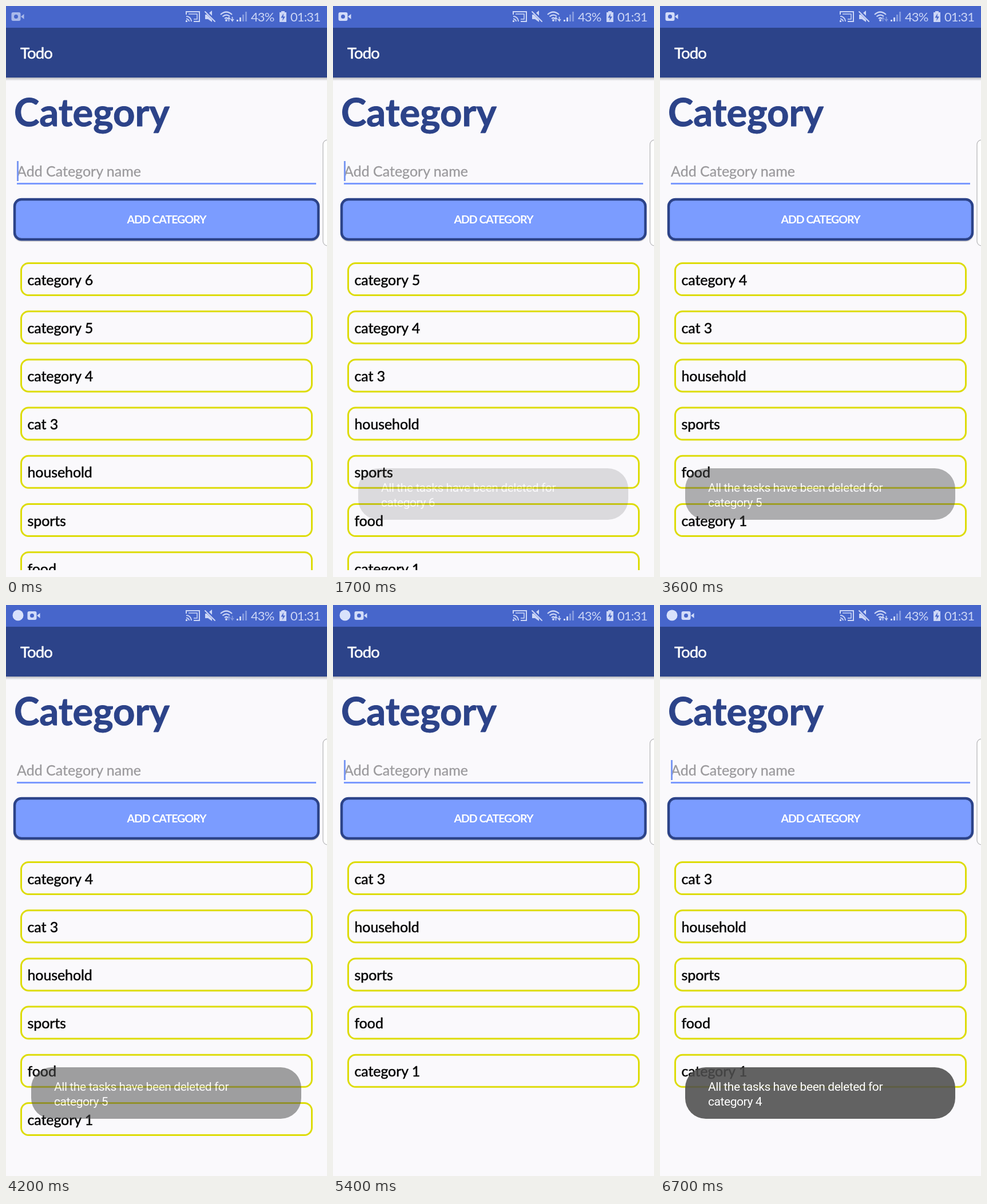
These frames come from a looping animation (561x998 px, 6.8 s). An HTML page:

```html
<!DOCTYPE html>
<html lang="en">
<head>
<meta charset="utf-8">
<title>Todo</title>
<style>
  html, body { margin: 0; width: 100%; height: 100%; overflow: hidden; background: #faf9fc; }
  svg { display: block; width: 561px; height: 998px; }
  text { font-family: Lato, "Open Sans", sans-serif; stroke-linejoin: round; white-space: pre; }
  .status { fill: #ccd6f6; font-size: 22px; letter-spacing: -.9px; }
  .row text { font-size: 25px; fill: #060606; stroke: #060606; stroke-width: .5; letter-spacing: -.1px; }
  .row rect { fill: none; stroke: #dddc08; stroke-width: 3; }
  #toast text { font: 21px Roboto, sans-serif; letter-spacing: -.44px; fill: #fff; }
</style>
</head>
<body>
<svg viewBox="0 0 561 998">
  <defs>
    <linearGradient id="shade" x2="0" y2="1">
      <stop stop-color="#777b88" stop-opacity=".65"/>
      <stop offset="1" stop-color="#999" stop-opacity="0"/>
    </linearGradient>
    <clipPath id="listClip"><rect y="430" width="561" height="556"/></clipPath>
    <clipPath id="rowClip"><rect x="12.5" y="435" width="536" height="84"/></clipPath>
  </defs>

  <rect width="561" height="998" fill="#faf9fc"/>
  <rect y="124" width="561" height="7" fill="url(#shade)"/>
  <rect y="38" width="561" height="87" fill="#2c4389"/>
  <rect width="561" height="38" fill="#4766cb"/>

  <!-- status bar -->
  <circle id="notice" cx="21" cy="18" r="9.5" fill="#d9e2fb"/>
  <g id="camera">
    <path fill-rule="evenodd" d="M3 1H13Q16 1 16 4V13Q16 16 13 16H3Q0 16 0 13V4Q0 1 3 1ZM8 5A3.5 3.5 0 1 0 8 12A3.5 3.5 0 1 0 8 5Z"/>
    <path d="M16.500 8.500L22 4V13Z"/>
  </g>
  <g fill="none" stroke="#ccd6f6" stroke-width="2">
    <path d="M315 15V10H338V27H328M315 18A9 9 0 0 1 324 27M315 22.500A5 5 0 0 1 320 27"/>
    <path d="M319 14H334V23H328" stroke-width="1.500"/>
    <path d="M375 15Q385 6 395 15M378.500 18.500Q385 13 391 18M382 22Q385 19.500 388 22" stroke-width="2.200"/>
    <path d="M348 10L365 27" stroke-linecap="round"/>
  </g>
  <g fill="#ccd6f6">
    <rect x="314" y="25" width="3" height="3"/>
    <path d="M348 15H351L360 24V28L353 23H348ZM355 12L360 8V17Z"/>
    <circle cx="385" cy="25" r="2"/>
    <path d="M403 24h3v3h-3zM408 20h3v7h-3z"/>
    <path d="M413 15h3v12h-3zM418 10h3v17h-3z" opacity=".45"/>
    <path fill-rule="evenodd" d="M481 9H487V11H490V28H478V11H481ZM485 13L480.500 20.500H484L483 26L488 18.500H484.500Z"/>
  </g>
  <path id="arrows" d="M389.500 27V20L387 23M389.500 20L392 23M395.500 19V26L393 23M395.500 26L398 23" fill="none" stroke="#ccd6f6" stroke-width="1.600"/>
  <text class="status" x="428" y="27">43%</text>
  <text class="status" x="497" y="27">01:31</text>

  <!-- header and form -->
  <text x="25" y="92" font-size="27.500" letter-spacing="-.9" fill="#fff" stroke="#fff" stroke-width=".5">Todo</text>
  <text x="14" y="210" font-size="67" font-weight="700" fill="#2c4389" stroke="#2c4389" stroke-width="1">Category</text>
  <text x="19" y="298" font-size="25" fill="#9b9a9d" stroke="#9b9a9d" stroke-width=".3">Add Category name</text>
  <rect x="19" y="309" width="523" height="3" fill="#7b9aff"/>
  <rect id="cursor" x="19" y="271" width="3" height="35" fill="#7b98f2"/>
  <rect x="13" y="338" width="535" height="74" rx="14" fill="#888" opacity=".35"/>
  <rect x="15" y="338" width="531" height="70" rx="12" fill="#7b9cff" stroke="#2c4389" stroke-width="4.500"/>
  <text x="280.500" y="380" font-size="19.500" font-weight="700" letter-spacing="-1" text-anchor="middle" fill="#fff">ADD CATEGORY</text>
  <rect x="554" y="234" width="30" height="185" rx="8" fill="#fff" stroke="#b9b9bb" stroke-width="1.300"/>

  <g id="list" clip-path="url(#listClip)"></g>
  <g clip-path="url(#rowClip)">
    <circle id="ripple" cx="345" r="1333" fill="#2c4389"/>
  </g>

  <g id="toast">
    <rect x="44" y="808" width="472" height="90" rx="36" fill="#4c4c4c" opacity=".87"/>
    <text x="84" y="849">All the tasks have been deleted for</text>
    <text id="toastName" x="84" y="875"></text>
  </g>
</svg>

<script>
const LOOP = 6800, STEP = 100, PITCH = 84.2, FADE = 500;
const names = ["category 6", "category 5", "category 4", "cat 3",
               "household", "sports", "food", "category 1"];
const removals = [1400, 3400, 5400];
const blinks = [300, 700, 1000, 1400, 1800, 2200, 2600, 3000, 3300, 3700,
                4000, 4400, 4800, 5200, 5500, 5900, 6400, 6700];
const toasts = [
  { from: 1600, to: 3250, name: names[0] },
  { from: 3350, to: 4000, name: names[1] },
  { from: 5500, to: LOOP, name: names[2] }
];
const ripples = [
  { from: 1000, life: 100 },
  { from: 3300, life: 100 },
  { from: 4600, life: 400 }
];

const $ = id => document.getElementById(id);
const clamp = v => Math.max(0, Math.min(1, v));
const passed = (times, t) => times.filter(x => x <= t).length;
const set = (id, attrs) => {
  for (const key in attrs) $(id).setAttribute(key, attrs[key]);
};

$("list").innerHTML = names.map((name, i) =>
  `<g class="row" transform="translate(0 ${i * PITCH})">
     <rect x="26.500" y="449.500" width="508" height="56" rx="13"/>
     <text x="37.500" y="487.500">${name}</text>
   </g>`).join("");
const rows = [...$("list").children];

function drawList(t) {
  const gone = passed(removals, t);
  rows.forEach((row, i) => {
    row.setAttribute("visibility", i < gone ? "hidden" : "visible");
    row.setAttribute("transform", `translate(0 ${(i - gone) * PITCH})`);
  });
}

function drawRipple(t) {
  const r = ripples.find(r => t >= r.from && t < r.from + r.life);
  const age = r ? t - r.from : 0;
  set("ripple", {
    cy: -833 + age * .7,
    opacity: r ? .25 * clamp((r.life - age) / 200) : 0
  });
}

function drawToast(t) {
  const cur = toasts.filter(x => x.from <= t).pop();
  const alpha = cur ? Math.min(clamp((t - cur.from) / FADE), clamp(1 - (t - cur.to) / FADE)) : 0;
  set("toast", { opacity: alpha });
  $("toastName").textContent = cur ? cur.name : "";
}

function drawStatus(t) {
  const noticed = t >= 3900;
  set("notice", { opacity: noticed ? 1 : 0 });
  set("camera", {
    transform: `translate(${noticed ? 37.5 : 9.5} 10)`,
    fill: t < 100 ? "#a9b9ea" : "#d2dcf9"
  });
  set("arrows", { opacity: t < 3000 || t >= 5200 ? 1 : .45 });
}

function draw(time) {
  const t = Math.floor((time % LOOP) / STEP) * STEP;
  set("cursor", { opacity: passed(blinks, t) % 2 ? 0 : 1 });
  drawStatus(t);
  drawList(t);
  drawRipple(t);
  drawToast(t);
}

const start = performance.now();
function tick() {
  draw(performance.now() - start);
  requestAnimationFrame(tick);
}
tick();
</script>
</body>
</html>
```
